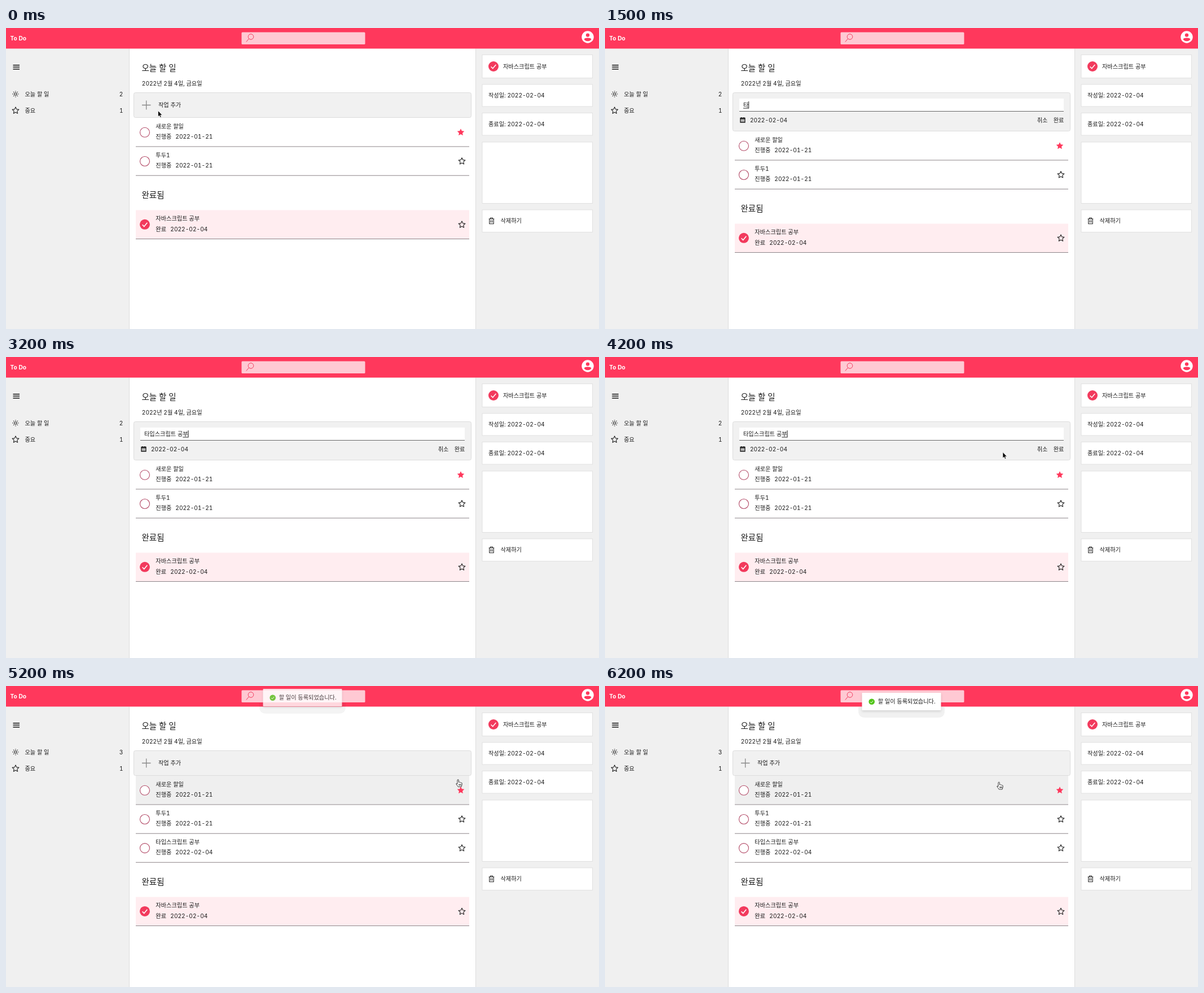
An HTML page for the animation above (6300 ms loop, 1051x533 px).

```html
<!DOCTYPE html>
<html lang="ko">
<head>
<meta charset="utf-8">
<title>To Do</title>
<style>
  html, body { margin: 0; width: 100%; height: 100%; overflow: hidden; background: #fff; }
  svg { display: block; width: 1051px; height: 533px; }
  text { font: 10.2px Inter, "Noto Sans CJK KR", "Noto Sans CJK", sans-serif; font-variant-numeric: tabular-nums; fill: #1c1c1c; white-space: pre; }
  .heading { font-size: 14.5px; }
  .brand { font-weight: 700; fill: #fff; }
  .hint { fill: #777; }
  .line { fill: none; stroke: #222; stroke-width: 1.1; stroke-linejoin: round; }
  .card { fill: #fff; stroke: #e1e1e1; }
</style>
</head>
<body>
<svg id="stage" viewBox="0 0 1051 533"></svg>
<script>
const PINK = '#ff385c', CHECK = '#f23a5d', GRAY = '#f0f0f0';
const LOOP = 6300, STEP = 100;
const OPENED = 600, ADDED = 5200, COMMITTED = 5100;

// Markup helpers; text is placed by its vertical centre.
const label = (x, y, str, cls = '') =>
  `<text x="${x}" y="${y + (cls === 'heading' ? 5.3 : 3.7)}" class="${cls}">${str}</text>`;
const rect = (x, y, w, h, attrs) => `<rect x="${x}" y="${y}" width="${w}" height="${h}" ${attrs}/>`;
const path = (d, attrs = 'class="line"') => `<path d="${d}" ${attrs}/>`;
const circle = (x, y, r, attrs) => `<circle cx="${x}" cy="${y}" r="${r}" ${attrs}/>`;
const group = (id, body) => `<g id="${id}">${body}</g>`;

function star(x, y, r, attrs) {
  const points = Array.from({ length: 10 }, (_, i) => {
    const a = i * Math.PI / 5, d = i % 2 ? r * 0.48 : r;
    return `${(x + d * Math.sin(a)).toFixed(2)} ${(y - d * Math.cos(a)).toFixed(2)}`;
  });
  return path(`M${points.join('L')}Z`, attrs);
}

const tick = (x, y, r, color) => circle(x, y, r, `fill="${color}"`) +
  path(`M${x - r * .48} ${y + r * .05}l${r * .34} ${r * .36} ${r * .62} ${-r * .75}`,
    `fill="none" stroke="#fff" stroke-width="${r * .17}"`);

function row(y, title, status, date, { done, starred } = {}) {
  return (done ? rect(230, y, 591, 50.5, 'fill="#ffedf0"') : '') +
    path(`M230 ${y + 51}H821`, 'stroke="#8c8488" stroke-width="1"') +
    (done ? tick(246, y + 25.3, 9, CHECK)
          : circle(246, y + 25.8, 8.5, 'fill="#fff" stroke="#b34b68" stroke-width="1.1"')) +
    label(265.3, y + 15, title) + label(265.3, y + 33.3, status) + label(done ? 291.3 : 300.3, y + 33.3, date) +
    (starred ? star(806, y + 25.9, 6.6, `fill="${PINK}"`) : star(808, y + 25.8, 6.2));
}

const sun = Array.from({ length: 8 }, (_, i) =>
  `<path d="M17 112.9v-1.5" transform="rotate(${i * 45} 17 116.9)" class="line"/>`).join('');

const header = rect(0, 0, 1051, 36.5, `fill="${PINK}"`) + label(7.5, 18, 'To Do', 'brand') +
  rect(417.5, 7.5, 219, 21.5, 'rx="1.5" fill="#ffc9d3"') +
  circle(434, 15.5, 4.8, `fill="none" stroke="${CHECK}"`) + path('M430.5 19l-4.7 5.5', `stroke="${CHECK}"`) +
  circle(1031, 16, 10.7, 'fill="#fff"') + circle(1031, 12.6, 3.2, `fill="${PINK}"`) +
  path('M1024.6 19.9C1025 16.6 1037 16.6 1037.4 19.9A7.7 7.7 0 0 1 1024.6 19.9Z', `fill="${PINK}"`);

const sidebar = rect(0, 36.5, 218.5, 497, `fill="${GRAY}"`) + path('M218.5 36.5V533', 'stroke="#dedede"') +
  path('M12.5 65.8H24M12.5 69.3H24M12.5 72.8H24', 'stroke="#111" stroke-width="1.5"') +
  circle(17, 116.9, 2.1, 'class="line"') + sun + label(33.5, 117, '오늘 할 일') +
  `<text id="count" x="200.8" y="120.7"></text>` +
  star(17, 146.3, 6.2) + label(33.5, 146, '중요') + label(201, 146, '1');

const card = (y, h) => rect(844, y, 195.5, h, 'class="card"');
const details = rect(832.5, 36.5, 219, 497, `fill="${GRAY}"`) + path('M832.5 36.5V533', 'stroke="#dedede"') +
  card(47.5, 41) + card(100, 39) + card(150.5, 39.5) + card(202, 108.5) + card(322, 39.5) +
  tick(864, 68, 9, CHECK) + label(881, 68, '자바스크립트 공부') +
  label(855, 119.7, '작성일: 2022-02-04') + label(855, 170.3, '종료일: 2022-02-04') +
  path('M855.7 338h9.6M858.5 338v-1.7h4v1.7M856.8 338v8.7h7.4V338M859.2 340.2v4.4M861.8 340.2v4.4') +
  label(876.5, 341.7, '삭제하기');

const panel = h => rect(226.5, 114.5, 598, h, 'rx="3" fill="#f1f1f1" stroke="#dcdcdc"');
const closedPanel = panel(44) + path('M241 136.5H256.5M248.7 128.5V144.5', 'stroke="#888" stroke-width="1.3"') +
  label(270, 136.3, '작업 추가');
const openPanel = panel(68) + rect(238, 125, 575, 22, 'fill="#fff"') + path('M238 147.5H813', 'stroke="#666"') +
  `<text id="input" x="245" y="140"></text>` +
  `<path id="underline" stroke="#222"/><path id="caret" stroke="#111"/>` +
  path('M240 159.5h8v7.5h-8ZM240 161.2h8M242 158v2M246 158v2', 'fill="none" stroke="#111" stroke-width="1.3"') +
  path('M241.5 163.3h5M241.5 165.2h5', 'stroke="#111" stroke-dasharray="1 1"') +
  label(257, 163, '2022-02-04') + label(765.7, 163, '취소') + label(794.7, 163, '완료');

const list = group('hover', rect(230, 159, 591, 50.5, 'fill="#efefef"')) +
  row(159, '새로운 할일', '진행중', '2022-01-21', { starred: true }) +
  row(210.2, '투두1', '진행중', '2022-01-21') +
  group('newRow', row(261.3, '타입스크립트 공부', '진행중', '2022-02-04')) +
  group('finished', label(240.5, 296, '완료됨', 'heading') +
    row(322.5, '자바스크립트 공부', '완료', '2022-02-04', { done: true }));

const toast = path('M449 37V44Q449 56 461 56H590Q602 56 602 44V37Z', 'fill="#000" opacity=".055"') +
  rect(455.5, 12, 140, 31, 'rx="1" fill="#fff" style="filter:drop-shadow(0 2px 2px #0002)"') +
  tick(472.7, 27.8, 5.3, '#52c41a') + label(483.7, 27.2, '할 일이 등록되었습니다.');

const cursors =
  group('arrow', path('M0 0V10.6L2.4 8.4 4 12 5.7 11.3 4.2 7.7H7.4Z', 'fill="#000" stroke="#fff" stroke-width=".7"')) +
  group('beam', path('M-2.8-6.3Q0-6.3 0-4.8Q0-6.3 2.8-6.3M0-5V5M-2.8 6.3Q0 6.3 0 4.8Q0 6.3 2.8 6.3M-1.5 1.5h3', 'fill="none" stroke="#111"')) +
  group('hand', path('M-1 7.5V1Q-1-.3 .2-.3Q1.3-.3 1.3 1V4.4Q2.5 3.6 3.4 4.8Q4.8 4.1 5.5 5.3Q7.3 5 7.3 6.8Q7.3 9.5 6 12.5H.3Q-1.4 9.8-3.2 7.5Q-3.5 5.6-1 7.5ZM1.8 7.5v3M3.5 7.5v3M5.2 7.5v3',
    'fill="#fff" stroke="#222" stroke-width=".9" stroke-linejoin="round"'));

document.getElementById('stage').innerHTML = sidebar + details +
  label(240.5, 71, '오늘 할 일', 'heading') + label(240.8, 98, '2022년 2월 4일, 금요일') +
  group('list', list) + group('closed', closedPanel) + group('open', openPanel) +
  header + group('toast', toast) + cursors;

const $ = id => document.getElementById(id);
const show = (id, on) => $(id).setAttribute('visibility', on ? 'inherit' : 'hidden');
const move = (id, x, y) => $(id).setAttribute('transform', `translate(${x} ${y})`);

const typing = [
  [1400, 'ㅌ'], [1500, '타'], [1600, '탕'], [1800, '타이'], [2000, '타입'], [2100, '타입스'],
  [2200, '타입스크'], [2300, '타입스클'], [2400, '타입스크리'], [2600, '타입스크립'], [2700, '타입스크립ㅌ'],
  [2800, '타입스크립트'], [2900, '타입스크립트 ㄱ'], [3000, '타입스크립트 공'], [3200, '타입스크립트 공부'],
];
const pointer = [
  [0, 269.5, 146.5], [100, 264, 143], [300, 255, 137], [500, 255, 137], [600, 256, 137], [1000, 260, 137],
  [1400, 260, 137], [3700, 345, 152], [4000, 590, 172], [4200, 705, 168.5], [4300, 765, 174],
  [4500, 790, 175], [5000, 801, 166], [5900, 801, 166], [6000, 780, 168], [6200, 698, 170.5], [LOOP, 698, 170.5],
];

function pointerAt(t) {
  const i = pointer.findIndex(p => p[0] > t);
  const [t0, x0, y0] = pointer[i - 1], [t1, x1, y1] = pointer[i];
  const k = (t - t0) / (t1 - t0);
  return [x0 + (x1 - x0) * k, y0 + (y1 - y0) * k];
}

function pointerKind(t) {
  if (t < 100) return 'arrow';
  if (t < OPENED) return 'hand';
  if (t < 1400) return 'beam';
  if (t < 3700) return '';
  return t < 4500 ? 'arrow' : 'hand';
}

function drawInput(t, open) {
  const [lastKey, text] = typing.findLast(k => k[0] <= t) || [1000, ''];
  const input = $('input');
  input.textContent = text || '작업 추가';
  input.setAttribute('class', text ? '' : 'hint');
  const end = text ? 245 + input.getComputedTextLength() : 245;
  const start = text.length > 1 ? 245 + input.getSubStringLength(0, text.length - 1) : 245;
  $('underline').setAttribute('d', `M${start} 142H${end}`);
  $('caret').setAttribute('d', `M${end + .3} 130V142.5`);
  show('underline', open && text && t < COMMITTED);
  show('caret', open && t >= 1000 && Math.floor((t - lastKey) / 500) % 2 === 0);
}

function draw(t) {
  const added = t >= ADDED, open = t >= OPENED && !added;
  show('closed', !open);
  show('open', open);
  show('hover', added);
  show('newRow', added);
  move('list', 0, open ? 24 : 0);
  move('finished', 0, added ? 51.1 : 0);
  $('count').textContent = added ? 3 : 2;
  drawInput(t, open);

  const k = Math.min(1, (t - ADDED) / 200), rest = (1 - k) ** 2;
  show('toast', added);
  move('toast', 0, -7 * rest);
  $('toast').setAttribute('opacity', 1 - .2 * rest);

  const kind = pointerKind(t), [x, y] = pointerAt(t);
  for (const id of ['arrow', 'beam', 'hand']) {
    show(id, id === kind);
    move(id, x, y);
  }
}

function tickFrame() {
  draw(Math.floor(performance.now() % LOOP / STEP) * STEP);
  requestAnimationFrame(tickFrame);
}
tickFrame();
</script>
</body>
</html>
```
